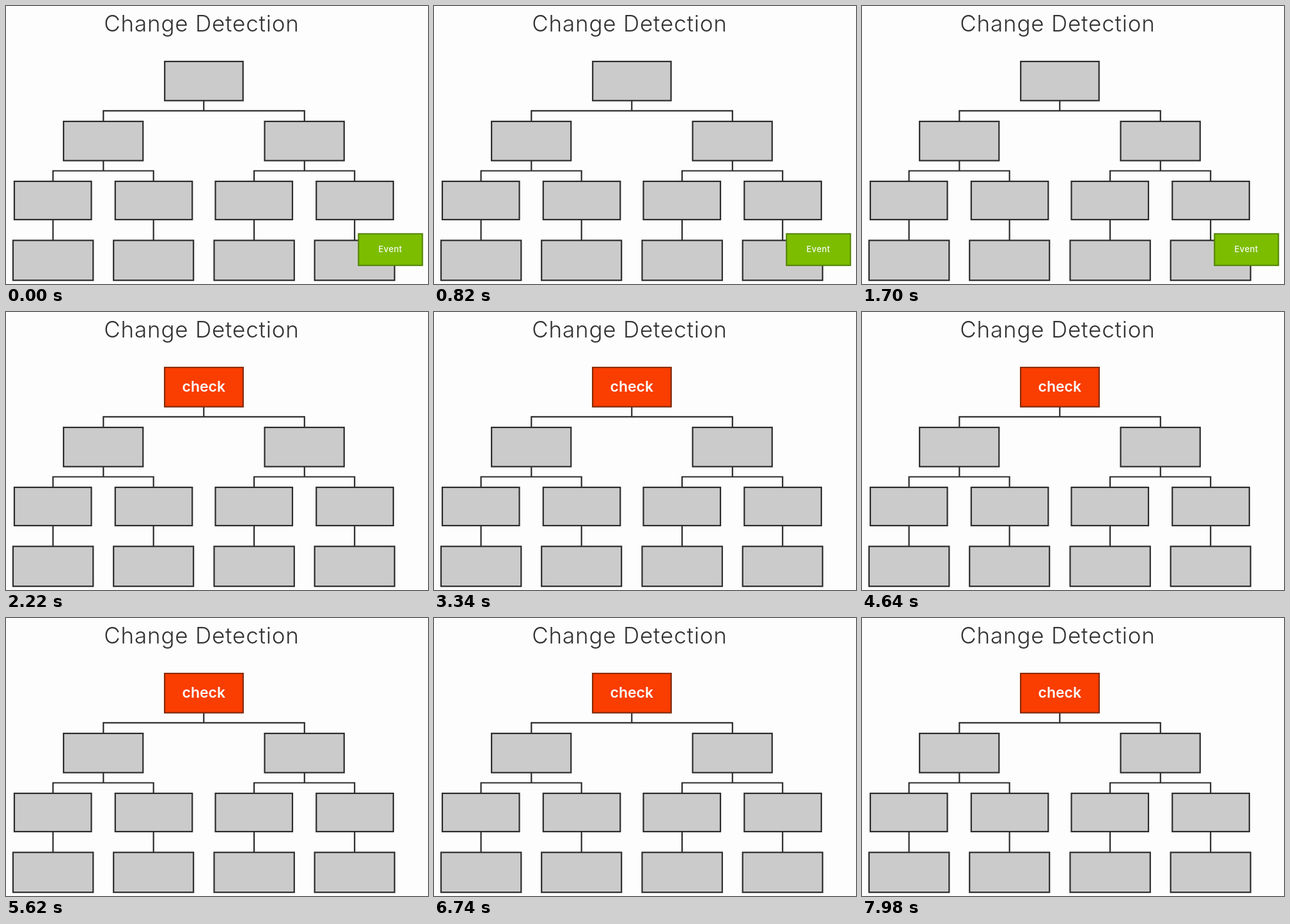
An HTML page that plays this animation: 660x436 px, repeating every 8 s.

```html
<!DOCTYPE html>
<html lang="en">
<head>
<meta charset="utf-8">
<title>Change Detection</title>
<style>
  html, body { margin: 0; width: 100%; height: 100%; overflow: hidden; background: #fdfdfd; }
  svg { display: block; width: 660px; height: 436px; }
  text { font-family: Inter, "Open Sans", sans-serif; text-anchor: middle; }
  .tree { stroke: #2c2c2f; stroke-width: 2.2; }
  rect { fill: #cbcbcb; }
  path { fill: none; }
  .title { font-size: 35px; font-weight: 300; letter-spacing: .8px; fill: #333; }
  .event rect { fill: #7cbd00; stroke: #508200; stroke-width: 2; }
  .event text { font-size: 13px; font-weight: 500; letter-spacing: .4px; fill: #fafafa; }
  .check rect { fill: #fa3d00; stroke: #8f2a00; stroke-width: 2; }
  .check text { font-size: 23px; font-weight: 600; fill: #fafafa; }
  .event { animation: hide 8s step-end infinite; }
  .check { animation: show 8s step-end infinite; }
  @keyframes hide { 0% { opacity: 1; } 24%, 100% { opacity: 0; } }
  @keyframes show { 0% { opacity: 0; } 24%, 100% { opacity: 1; } }
</style>
</head>
<body>
<svg viewBox="0 0 660 436">
  <defs>
    <g id="branch">
      <path d="M152.3 242V258.5M73.5 275V258.5H230.7V275M73.5 335V368M230.7 335V368"/>
      <rect x="90" y="181" width="124.3" height="61.5"/>
      <rect x="13" y="275" width="120.5" height="60"/>
      <rect x="170.8" y="275" width="120.5" height="60"/>
      <rect x="11" y="367.6" width="125.3" height="62.6"/>
      <rect x="168.2" y="367.6" width="125" height="62.6"/>
    </g>
  </defs>
  <text class="title" x="306" y="40">Change Detection</text>
  <g class="tree">
    <path d="M309.3 148V164.3M152.3 181V164.3H466.8V181"/>
    <rect x="248.2" y="87" width="122.5" height="61.4"/>
    <use href="#branch"/>
    <use href="#branch" x="314.5"/>
  </g>
  <g class="event">
    <rect x="551.3" y="357.3" width="100" height="49.5"/>
    <text x="601" y="386">Event</text>
  </g>
  <g class="check">
    <rect x="248.2" y="87" width="122.5" height="61.4"/>
    <text x="309.3" y="125">check</text>
  </g>
</svg>
</body>
</html>
```
